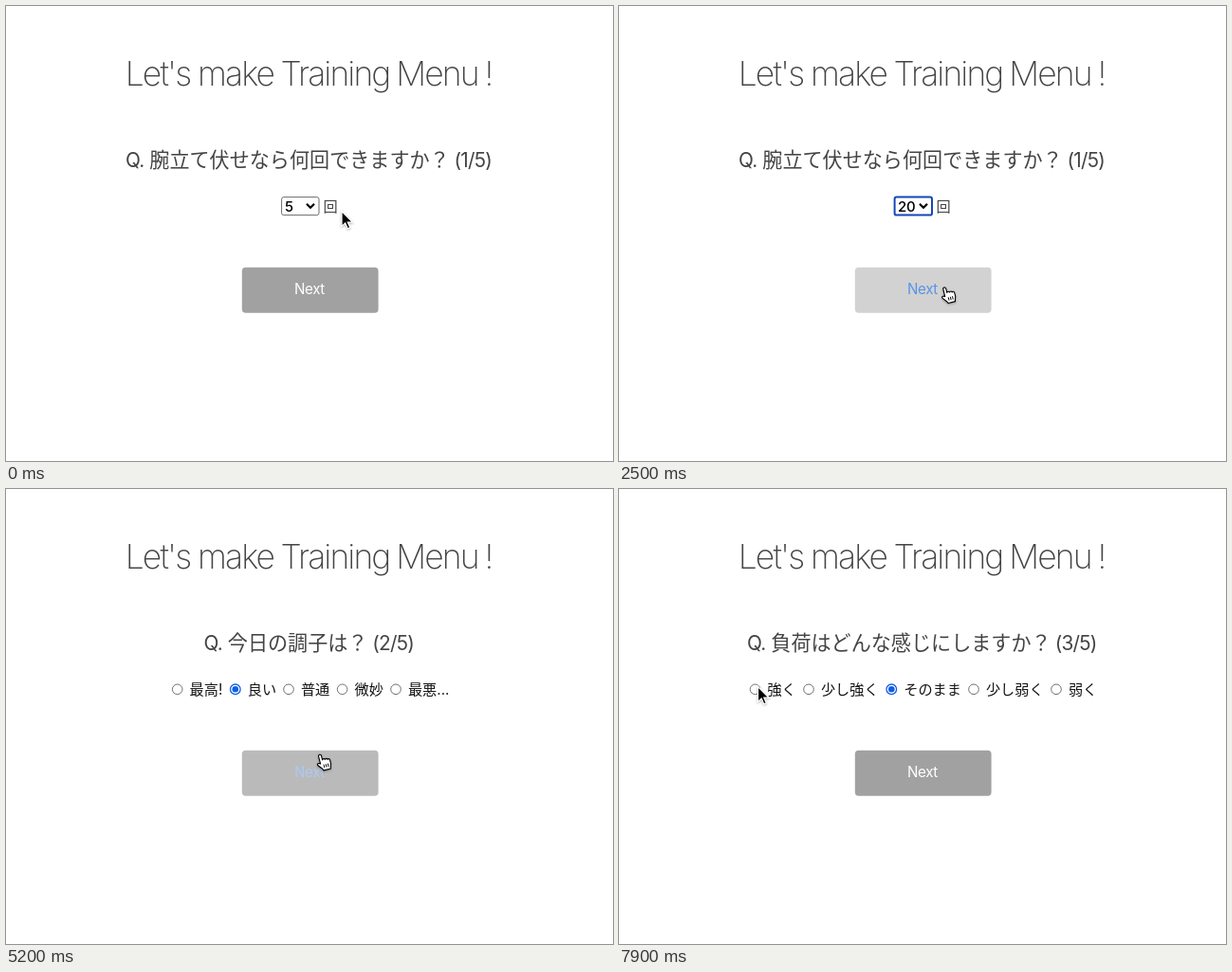
An HTML page that plays this animation: 640x480 px, repeating every 8 s.

```html
<!DOCTYPE html>
<html lang="ja">
<head>
<meta charset="utf-8">
<title>Training Menu</title>
<style>
  html, body { margin: 0; width: 100%; height: 100%; overflow: hidden; background: #fff; }
  svg { display: block; width: 100vw; height: 100vh; }
  text { font-family: Inter, "Noto Sans CJK JP", "Noto Sans CJK", sans-serif; font-optical-sizing: none; }
  .title { font-size: 35.5px; font-weight: 200; letter-spacing: -1.9px; fill: #444; text-anchor: middle; }
  .question { font-size: 21.1px; font-weight: 500; fill: #444; }
  .latin { font-size: 20.8px; font-weight: 400; letter-spacing: -.8px; }
  .end { text-anchor: end; }
  .label { font-size: 15.2px; fill: #151515; }
  .unit { fill: #444; }
  .value { font-size: 15px; font-weight: 500; letter-spacing: -.2px; fill: #000; }
  .next { font-size: 15.2px; letter-spacing: -.4px; text-anchor: middle; }
  .item { font-size: 14.2px; font-weight: 500; fill: #fff; }
  .menu { filter: drop-shadow(0 4px 5px rgba(0,0,0,.28)); }
  .cursor { filter: drop-shadow(0 1px 1px rgba(0,0,0,.3)); }
</style>
</head>
<body>
<svg id="stage" viewBox="0 0 640 480">
  <defs>
    <linearGradient id="blue" x2="0" y2="1">
      <stop stop-color="#3a78f0"/><stop offset="1" stop-color="#2b67e6"/>
    </linearGradient>
  </defs>
  <rect width="640" height="480" fill="#fff"/>
  <g id="title"></g>
  <g id="content">
    <g id="page0">
      <rect id="box" x="290.6" y="201.6" width="39.4" height="19" rx="2.2" fill="#fff"/>
      <text id="value" class="value" x="294" y="217"></text>
      <path d="M317 208.8l4 4 4-4" fill="none" stroke="#000" stroke-width="2.2"/>
      <text class="label unit" x="334.5" y="217">回</text>
    </g>
    <g id="page1"></g>
    <g id="page2"></g>
    <rect id="button" x="248.8" y="275.8" width="143.8" height="48" rx="4"/>
    <text id="next" class="next" x="320" y="303.5">Next</text>
  </g>
  <g id="menu" class="menu">
    <rect x="280.5" y="192.5" width="62" height="256" rx="6" fill="#4d4a4b" stroke="#383637"/>
    <rect x="281.5" y="193.5" width="60" height="254" rx="5" fill="none" stroke="#757273" stroke-width=".8"/>
    <rect id="highlight" x="286" width="51.5" height="24.5" rx="4" fill="url(#blue)"/>
    <path d="M291.5 211.5l3 4 5.5-8.5" fill="none" stroke="#fff" stroke-width="2" stroke-linecap="round"/>
    <g id="items"></g>
  </g>
  <g id="cursor" class="cursor">
    <path id="arrow" d="M0 0V16L3.7 12.6 6.3 18.4 8.8 17.3 6.3 11.6H11.4Z" fill="#000" stroke="#fff" stroke-width="1.2"/>
    <g id="hand" transform="rotate(-14)" stroke="#000" stroke-width="1.1" stroke-linejoin="round">
      <path fill="#fff" d="M-1.6 9.5V1.4a1.5 1.5 0 0 1 3 0V6c.3-1.2 2.6-1.2 2.9.2.4-1 2.4-.9 2.6.6.5-.8 2.2-.5 2.2 1.2v3.5c0 2-1.4 3-1.4 5.5H0c-.4-2.5-3.2-4-4.6-6.8-.8-1.5 1-2.4 3-.7Z"/>
      <path fill="none" stroke-width=".9" d="M1.6 11v3.4M3.8 11v3.4M6 11v3.4"/>
    </g>
  </g>
</svg>
<script>
const LOOP = 8000, STEP = 100;
const $ = id => document.getElementById(id);

function add(parent, tag, attrs, text = '') {
  const el = document.createElementNS('http://www.w3.org/2000/svg', tag);
  for (const name in attrs) el.setAttribute(name, attrs[name]);
  el.textContent = text;
  parent.append(el);
  return el;
}
const set = (id, name, value) => $(id).setAttribute(name, value);
const show = (id, visible) => set(id, 'visibility', visible ? 'visible' : 'hidden');

const clamp = v => Math.max(0, Math.min(1, v));
const ramp = (t, from, to) => clamp((t - from) / (to - from));
const mix = (a, b, k) => a + (b - a) * k;
const mixColor = (a, b, k) => `rgb(${a.map((v, i) => Math.round(mix(v, b[i], k)))})`;

// Static parts
[["Let's", 160], ['make', 242], ['Training', 347], ['Menu', 454.5], ['!', 508.5]]
  .forEach(([word, x]) => add($('title'), 'text', { class: 'title', x, y: 84 }, word));

function addQuestion(page, left, right, text, count) {
  add(page, 'text', { class: 'question latin', x: left - 1, y: 170 }, 'Q.');
  add(page, 'text', { class: 'question', x: left + 24.3, y: 170 }, text);
  add(page, 'text', { class: 'question latin end', x: right, y: 170 }, count);
}
addQuestion($('page0'), 127, 512, '腕立て伏せなら何回できますか？', '(1/5)');
addQuestion($('page1'), 209.5, 430, '今日の調子は？', '(2/5)');
addQuestion($('page2'), 136, 503.5, '負荷はどんな感じにしますか？', '(3/5)');

function addRadios(page, options) {
  return options.map(([x, label]) => {
    const ring = add(page, 'circle', { cx: x, cy: 211.3, r: 5.3, fill: '#fff' });
    const dot = add(page, 'circle', { cx: x, cy: 211.3, r: 3.3, fill: '#0f5fe6' });
    add(page, 'text', { class: 'label', x: x + 12.9, y: 217 }, label);
    return on => {
      ring.setAttribute('stroke', on ? '#0f5fe6' : '#707070');
      ring.setAttribute('stroke-width', on ? 1.3 : 1);
      dot.setAttribute('opacity', on ? 1 : 0);
    };
  });
}
const mood = addRadios($('page1'),
  [[180.7, '最高!'], [241.8, '良い'], [298, '普通'], [354.6, '微妙'], [411, '最悪...']]);
const load = addRadios($('page2'),
  [[143.5, '強く'], [200, '少し強く'], [287.3, 'そのまま'], [374, '少し弱く'], [461, '弱く']]);
load.forEach((check, i) => check(i === 2));

const ITEM = 24.5, itemY = i => 211 + i * ITEM;
for (let i = 0; i < 10; i++)
  add($('items'), 'text', { class: 'item', x: 306.5, y: itemY(i) + 5.1 }, 5 * (i + 1));

// Pointer path: time, x, y
const path = [
  [0, 354, 216.5], [200, 354, 216.5], [400, 322, 212], [700, 321.5, 262], [1000, 322, 285],
  [1200, 322, 285], [1700, 334, 287], [2000, 343, 297], [3200, 343, 297], [3700, 262, 232],
  [4200, 243, 213], [4700, 243, 213], [5400, 352.5, 297], [6500, 352.5, 297],
  [7300, 293, 212], [7900, 146.5, 208.5], [8000, 146.5, 208.5]
];
function pointerAt(t) {
  const i = path.findIndex((p, n) => n && t <= p[0]);
  const [t0, x0, y0] = path[i - 1], [t1, x1, y1] = path[i];
  const k = ramp(t, t0, t1), ease = k * k * (3 - 2 * k);
  return [mix(x0, x1, ease), mix(y0, y1, ease)];
}

const hovers = [[1800, 3400], [5200, 6700]];
const fades = [[2600, 2730], [5550, 5680]];
const FADE_IN = 400, MENU_OPEN = 400, MENU_CLOSE = 1200;

function draw(t) {
  const [x, y] = pointerAt(t);
  set('cursor', 'transform', `translate(${x} ${y})`);
  const hovering = hovers.some(([from, to]) => t >= from && t < to);
  show('hand', hovering);
  show('arrow', !hovering);

  const page = fades.filter(([, swap]) => t >= swap).length;
  for (let i = 0; i < 3; i++) set('page' + i, 'display', i === page ? 'inline' : 'none');
  const opacity = fades.reduce((o, [out, swap]) =>
    t < out ? o : t < swap ? 1 - ramp(t, out, swap) : ramp(t, swap, swap + FADE_IN), 1);
  set('content', 'opacity', opacity);

  const glow = Math.max(...hovers.map(([from, to]) =>
    ramp(t, from - 100, from + 100) * (1 - ramp(t, to - 100, to + 100))));
  set('button', 'fill', mixColor([161, 161, 161], [210, 210, 210], glow));
  set('next', 'fill', mixColor([255, 255, 255], [88, 148, 230], glow));

  const chosen = t >= MENU_CLOSE;
  $('value').textContent = chosen ? 20 : 5;
  set('box', 'stroke', chosen ? '#1549b4' : '#6d6d6d');
  set('box', 'stroke-width', chosen ? 2 : 1);
  mood.forEach((check, i) => check(i === (t < 4700 ? 2 : 1)));

  set('menu', 'display', t >= MENU_OPEN && !chosen ? 'inline' : 'none');
  const row = Math.max(0, Math.round((y - itemY(0)) / ITEM));
  set('highlight', 'y', itemY(row) - 12.8);
}

function frame(now) {
  draw(Math.floor(now % LOOP / STEP) * STEP);
  requestAnimationFrame(frame);
}
draw(0);
requestAnimationFrame(frame);
</script>
</body>
</html>
```
